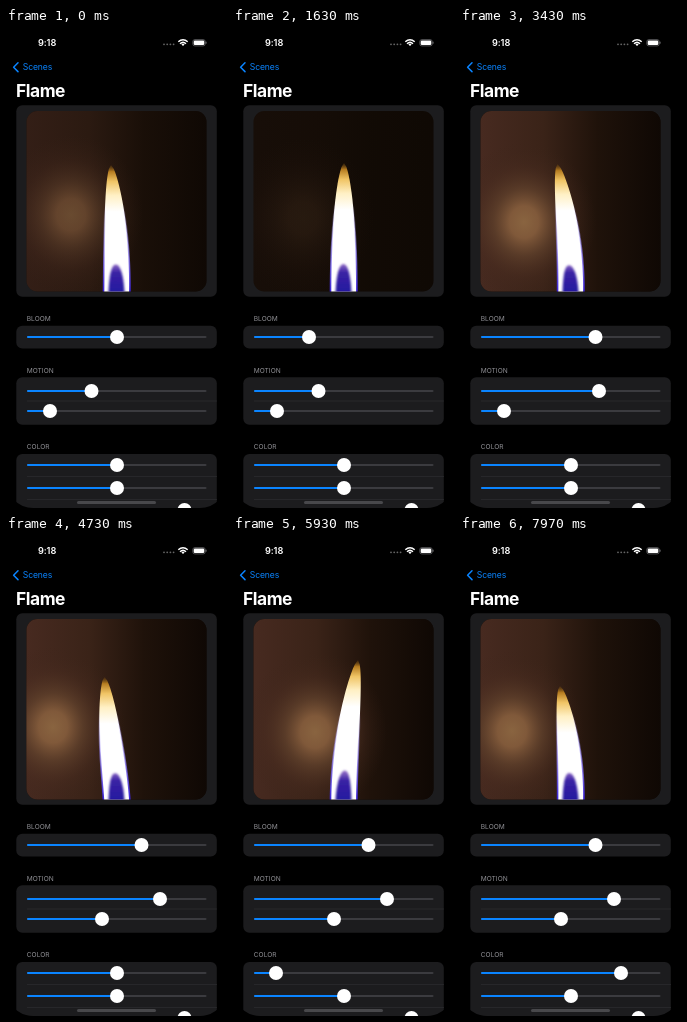
Recreate the animation shown at these times as an HTML page. Size 221 by 480 pixels, loop 8000 ms.

```html
<!DOCTYPE html>
<html lang="en">
<head>
<meta charset="utf-8">
<title>Flame</title>
<style>
  html, body { margin: 0; width: 100%; height: 100%; overflow: hidden; background: #000; }
  svg { display: block; width: 100%; height: 100%; }
  text { font-family: Inter, Roboto, sans-serif; fill: #fff; }
  .head { font-size: 6.6px; fill: #8e8e93; }
  .card { fill: #1c1c1e; }
  .line { stroke: #303033; stroke-width: .6; }
  .track { stroke: #3b3b3f; stroke-width: 2; stroke-linecap: round; }
  .fill { stroke: #0a84ff; stroke-width: 2; stroke-linecap: round; }
</style>
</head>
<body>
<svg viewBox="0 0 221 480">
  <defs>
    <clipPath id="screen"><rect y="-40" width="221" height="520" rx="27"/></clipPath>
    <clipPath id="photo"><rect x="20.5" y="83" width="180" height="180.5" rx="11"/></clipPath>
    <linearGradient id="wall">
      <stop offset="0" stop-color="#472a20"/>
      <stop offset=".35" stop-color="#3a2318"/>
      <stop offset=".65" stop-color="#1f120a"/>
      <stop offset="1" stop-color="#0f0804"/>
    </linearGradient>
    <radialGradient id="halo">
      <stop offset="0" stop-color="#896440"/>
      <stop offset=".2" stop-color="#80593a"/>
      <stop offset=".42" stop-color="#5f402b" stop-opacity=".8"/>
      <stop offset=".7" stop-color="#4a2d20" stop-opacity=".35"/>
      <stop offset="1" stop-color="#3a2318" stop-opacity="0"/>
    </radialGradient>
    <linearGradient id="heat" gradientUnits="userSpaceOnUse" x1="0" x2="0" y1="138" y2="193">
      <stop offset="0" stop-color="#5c3a0c" stop-opacity=".4"/>
      <stop offset=".12" stop-color="#b67c20"/>
      <stop offset=".3" stop-color="#f0c465"/>
      <stop offset=".55" stop-color="#fff0c4"/>
      <stop offset=".85" stop-color="#fff"/>
    </linearGradient>
    <linearGradient id="edge" gradientUnits="userSpaceOnUse" x1="0" x2="0" y1="263" y2="175">
      <stop offset="0" stop-color="#3a22d8"/>
      <stop offset=".45" stop-color="#8a78f0" stop-opacity=".7"/>
      <stop offset="1" stop-color="#b8a8ff" stop-opacity="0"/>
    </linearGradient>
    <linearGradient id="core" gradientUnits="userSpaceOnUse" x1="0" x2="0" y1="234" y2="264">
      <stop offset="0" stop-color="#7a48b8" stop-opacity=".75"/>
      <stop offset=".35" stop-color="#3a22a4"/>
      <stop offset="1" stop-color="#2419a0"/>
    </linearGradient>
    <filter id="soft" x="-30%" y="-10%" width="160%" height="120%"><feGaussianBlur stdDeviation=".6"/></filter>
    <filter id="softer" x="-40%" y="-30%" width="180%" height="160%"><feGaussianBlur stdDeviation="1.1"/></filter>
  </defs>
  <rect width="221" height="480"/>

  <text x="32" y="18.3" font-size="9.2" font-weight="600" letter-spacing="-.1">9:18</text>
  <g fill="#666"><circle cx="158" cy="16.3" r=".9"/><circle cx="161.2" cy="16.3" r=".9"/><circle cx="164.4" cy="16.3" r=".9"/><circle cx="167.6" cy="16.3" r=".9"/></g>
  <g fill="none" stroke="#fff" stroke-width="1.5">
    <path d="M172.3 13.8Q177 9.6 181.7 13.8M174 15.7Q177 13.1 180 15.7"/>
    <path d="M175.4 16.4Q177 15.3 178.6 16.4L177 18Z" fill="#fff" stroke="none"/>
  </g>
  <rect x="186.8" y="11.6" width="12.4" height="6.3" rx="2" fill="none" stroke="#88888c" stroke-width=".6"/>
  <rect x="187.7" y="12.5" width="10.6" height="4.5" rx="1.2" fill="#fff"/>
  <path d="M200.1 13.7v2" stroke="#88888c" stroke-width=".8"/>

  <path d="M12 34.8L7.6 39.2L12 43.6" fill="none" stroke="#0a84ff" stroke-width="1.5" stroke-linecap="round" stroke-linejoin="round"/>
  <text x="16.8" y="42.3" font-size="8.6" letter-spacing="-.12" style="fill:#0a84ff">Scenes</text>
  <text x="10" y="69" font-size="17.4" font-weight="700" letter-spacing="-.45">Flame</text>

  <g clip-path="url(#screen)">
    <rect class="card" x="10.3" y="77.3" width="200.5" height="191.5" rx="6"/>
    <g clip-path="url(#photo)">
      <rect x="20" y="83" width="181" height="181" fill="#0f0904"/>
      <rect id="room" x="20" y="83" width="181" height="181" fill="url(#wall)"/>
      <ellipse id="glow" rx="72" ry="80" fill="url(#halo)"/>
      <g filter="url(#soft)">
        <path id="flame" fill="url(#heat)" stroke="url(#edge)" stroke-width="1.6"/>
      </g>
      <path id="heart" fill="url(#core)" filter="url(#softer)"/>
    </g>
    <text class="head" x="20.8" y="293">BLOOM</text>
    <rect class="card" x="10.3" y="297.7" width="200.5" height="22.8" rx="6"/>
    <text class="head" x="20.8" y="344.6">MOTION</text>
    <rect class="card" x="10.3" y="349.3" width="200.5" height="47.5" rx="6"/>
    <text class="head" x="20.8" y="421">COLOR</text>
    <rect class="card" x="10.3" y="426" width="200.5" height="70" rx="6"/>
    <path class="line" d="M21 373H211M21 448.5H211M21 471.5H211"/>
    <g id="sliders"></g>
    <rect x="71" y="473" width="79" height="3" rx="1.5" fill="#48484b"/>
  </g>
</svg>
<script>
const LOOP = 8000, BASE = 265, MID = 110.7;
const $ = id => document.getElementById(id);
const set = (el, attrs) => { for (const k in attrs) el.setAttribute(k, attrs[k]); };
const clamp = v => Math.max(0, Math.min(1, v));

// Eased value between [time, ...values] keys
function sample(keys, t) {
  if (t <= keys[0][0]) return keys[0].slice(1);
  for (let i = 1; i < keys.length; i++) {
    const a = keys[i - 1], b = keys[i];
    if (t > b[0]) continue;
    const u = (1 - Math.cos(Math.PI * (t - a[0]) / (b[0] - a[0]))) / 2;
    return a.slice(1).map((v, j) => v + (b[j + 1] - v) * u);
  }
  return keys[keys.length - 1].slice(1);
}

// Thumb positions over time
const sliders = [
  { y: 309, keys: [[250, 111], [1550, 76], [1680, 76], [2500, 135.5]] },
  { y: 363, keys: [[2650, 85.5], [3430, 139], [3900, 154]] },
  { y: 383, keys: [[4050, 44], [4730, 96], [5050, 101]] },
  { y: 437, keys: [[5050, 111], [5880, 43], [5930, 43], [6650, 161]] },
  { y: 460, keys: [[0, 111]] },
  { y: 482, keys: [[0, 178.5]] }
];

// time, tip x, tip y, bend, glow x, glow y
const sway = [
  [0, 105, 137, .8, 65, 187],
  [1630, 111, 135, 0, 70, 190],
  [3430, 97.5, 136, 1.4, 64, 194],
  [4730, 98.5, 141, -1.8, 47, 191],
  [5930, 125, 124, -.6, 82, 196],
  [7230, 109, 142, .9, 66, 191],
  [7970, 100, 150, 1.2, 52, 195]
];

function make(tag, attrs) {
  const el = document.createElementNS("http://www.w3.org/2000/svg", tag);
  set(el, attrs);
  return $("sliders").appendChild(el);
}

for (const s of sliders) {
  make("path", { class: "track", d: `M22 ${s.y}H199.5` });
  s.fill = make("path", { class: "fill" });
  s.thumb = make("circle", { cy: s.y, r: 7, fill: "#fff" });
}

function outline(tipX, tipY, bend) {
  const left = [], right = [], steps = 32;
  for (let i = 0; i <= steps; i++) {
    const u = i / steps;
    const y = BASE + (tipY - BASE) * u;
    const x = MID + (tipX - MID) * u ** 1.5 + bend * Math.sin(Math.PI * u);
    const w = 13.2 * (1 - u * u) ** .6;
    left.push(`${(x - w).toFixed(2)} ${y.toFixed(2)}`);
    right.unshift(`${(x + w).toFixed(2)} ${y.toFixed(2)}`);
  }
  return `M${left.concat(right).join("L")}Z`;
}

function draw(t) {
  for (const s of sliders) {
    const [x] = sample(s.keys, t);
    set(s.fill, { d: `M22 ${s.y}H${x}` });
    set(s.thumb, { cx: x });
  }
  const [bloomX] = sample(sliders[0].keys, t);
  const bloom = clamp(((bloomX - 21) / 179 - .25) / .39);
  const [tipX, tipY, bend, glowX, glowY] = sample(sway, t);
  set($("room"), { opacity: bloom });
  set($("glow"), { cx: glowX, cy: glowY, opacity: bloom });
  set($("flame"), { d: outline(tipX, tipY, bend) });
  set($("heat"), { y1: tipY, y2: tipY + 55 });

  const top = 236 + (tipX - MID) * -.1, cx = MID + (tipX - MID) * .1 - .3;
  set($("heart"), { d: `M102.5 266C103 250 ${cx - 5} ${top} ${cx} ${top}S118 250 118.5 266Z` });
}

const start = performance.now();
function tick() {
  draw((performance.now() - start) % LOOP);
  requestAnimationFrame(tick);
}
draw(0);
requestAnimationFrame(tick);
</script>
</body>
</html>
```
